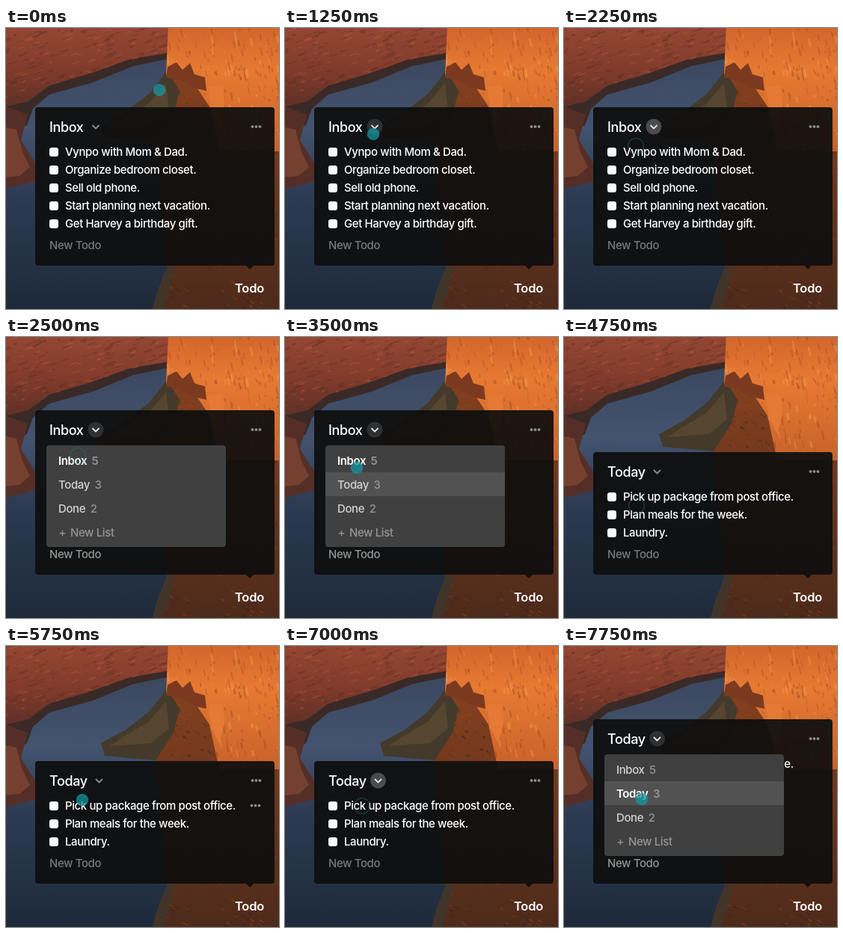
Recreate the animation shown at these times as an HTML page. Size 365x376 px, loop 8000 ms.

```html
<!DOCTYPE html>
<html lang="en">
<head>
<meta charset="utf-8">
<title>Todo</title>
<style>
  html, body { margin: 0; width: 100%; height: 100%; overflow: hidden; background: #26374f; }
  svg { display: block; width: 365px; height: 376px; }
  text { font: 500 15px Inter, Roboto, sans-serif; letter-spacing: -.4px; fill: #fff; }
  .title { font-size: 18px; }
  .muted { fill: #949494; }
  .dim { fill: #787878; }
  .soft { fill: #d2d2d2; }
  .bold { font-weight: 600; fill: #fff; }
  .brand { font-size: 16.5px; font-weight: 600; letter-spacing: -.25px; }
</style>
</head>
<body>
<svg viewBox="0 0 365 376">
  <defs>
    <linearGradient id="water" x2="0" y2="1">
      <stop offset=".1" stop-color="#3b475e"/>
      <stop offset=".36" stop-color="#43536f"/>
      <stop offset=".6" stop-color="#2c3b52"/>
      <stop offset="1" stop-color="#1e2a3a"/>
    </linearGradient>
    <linearGradient id="shade" x2="0" y2="1">
      <stop stop-color="#954833"/>
      <stop offset=".5" stop-color="#833c2b"/>
      <stop offset="1" stop-color="#5f3028"/>
    </linearGradient>
    <linearGradient id="sun" x2="0" y2="1">
      <stop stop-color="#d1652b"/>
      <stop offset=".35" stop-color="#e67a33"/>
      <stop offset="1" stop-color="#c9622a"/>
    </linearGradient>
    <linearGradient id="ground" x2="0" y2="1">
      <stop stop-color="#84401f"/>
      <stop offset="1" stop-color="#4d2a1b"/>
    </linearGradient>
    <filter id="blur"><feGaussianBlur stdDeviation=".7"/></filter>
    <clipPath id="shadeClip"><path d="M0 0H218V34L165 43 112 62 58 78 30 98 0 106Z"/></clipPath>
    <clipPath id="sunClip"><path d="M217 0H365V165H285L272 105 250 72 214 62Z"/></clipPath>
    <clipPath id="groundClip"><path d="M216 62H285V150H365V376H195L215 320 200 150Z"/></clipPath>
  </defs>
  <rect width="365" height="376" fill="url(#water)"/>
  <g filter="url(#blur)">
    <path fill="#3a2a27" d="M-3 90 58 76 112 58 165 40 218 30V41L170 51 116 73 58 89 36 108 28 130 -3 145Z"/>
    <path fill="url(#shade)" d="M-3 -3H218V33L165 42 112 61 58 77 30 98 -3 106Z"/>
    <g id="shadeRock" clip-path="url(#shadeClip)"></g>
    <path fill="#552f27" d="M-3 104 29 116 20 150 40 182 40 205 -3 216Z"/>
    <path fill="#75402f" d="M-3 132 14 136 22 166 32 186 18 198 -3 200Z"/>
    <path fill="url(#ground)" d="M216 60H290V150H368V379H195L215 320 200 150Z"/>
    <g id="groundRock" clip-path="url(#groundClip)"></g>
    <path fill="#443a2b" d="M215 56 208 67 191 88 160 112 127 130 132 147 200 153 224 116 232 84Z"/>
    <path fill="#57462f" d="M214 74 190 102 156 122 138 134 194 130 218 110Z"/>
    <path fill="url(#sun)" d="M217 -3H368V165H285L272 105 250 72 214 62Z"/>
    <g id="sunRock" clip-path="url(#sunClip)"></g>
    <path fill="#7b3a20" d="M216 52 228 46 236 56 246 47 252 62 266 66 268 84 250 80 232 70 214 66Z"/>
    <path fill="#e47a36" d="M270 78 290 77 292 104 285 130 274 108Z"/>
    <path fill="#41352a" d="M195 379 203 350 215 320 226 318 218 350 209 379Z"/>
  </g>
  <g id="app"></g>
  <text class="brand" x="306" y="354">Todo</text>
  <circle id="cursor"/>
</svg>
<script>
const LOOP = 8000, STEP = 250;
const $ = id => document.getElementById(id);

function seeded(seed) {
  return () => (seed = (seed * 16807) % 2147483647) / 2147483647;
}

// Rock texture: short strokes that lean along the strata or the cracks.
function rock(id, count, [x, y, w, h], [dx, dy], colors) {
  const rnd = seeded(count * 97 + x);
  let out = '';
  for (let i = 0; i < count; i++) {
    const len = .3 + rnd();
    const px = x + rnd() * w, py = y + rnd() * h;
    const color = colors[Math.floor(rnd() * colors.length)];
    out += `<path d="M${px} ${py}l${dx * len} ${dy * len}" stroke="${color}" stroke-width="${1 + rnd() * 2}" opacity=".38"/>`;
  }
  $(id).innerHTML = out;
}
rock('shadeRock', 230, [-10, 0, 230, 100], [9, -3], ['#572a22', '#b05a40', '#6b3227']);
rock('sunRock', 190, [215, 0, 150, 165], [2, 9], ['#93421f', '#f7a052', '#b04f25']);
rock('groundRock', 330, [190, 60, 175, 316], [5, 3], ['#33241a', '#9a4a24', '#5c2e1c']);

const LISTS = {
  Inbox: ['Vynpo with Mom &amp; Dad.', 'Organize bedroom closet.', 'Sell old phone.',
          'Start planning next vacation.', 'Get Harvey a birthday gift.'],
  Today: ['Pick up package from post office.', 'Plan meals for the week.', 'Laundry.']
};
const MENU = [['Inbox', 5], ['Today', 3], ['Done', 2]];

// Cursor stops: time, x, y
const PATH = [
  [0, 205, 83], [1000, 127, 156], [1250, 118, 142], [1750, 101, 141], [2000, 101, 141],
  [2250, 96, 158], [2500, 96, 159], [3250, 96, 168], [4250, 97, 213], [4500, 97, 228],
  [4750, 97, 226], [5000, 91, 205], [5500, 91, 205], [5750, 102, 206], [6000, 116, 118],
  [6250, 104, 189], [6500, 104, 189], [7000, 103, 214], [7250, 103, 214], [7750, 104, 205],
  [8000, 104, 205]
];
const CLICKS = [2250, 4500, 7000];

const within = (t, from, to) => t >= from && t < to;
const text = (x, y, body, cls = '') => `<text class="${cls}" x="${x}" y="${y}">${body}</text>`;
const dots = (x, y) => [-5, 0, 5]
  .map(d => `<rect x="${x + d - 1.8}" y="${y - 1.8}" width="3.6" height="3.6" rx="1.4" fill="#8c8c8c"/>`).join('');

function cursorAt(t) {
  const i = PATH.findIndex(p => p[0] > t) - 1;
  const [t0, x0, y0] = PATH[i], [t1, x1, y1] = PATH[i + 1];
  const u = (t - t0) / (t1 - t0), e = u * u * (3 - 2 * u);
  return [x0 + (x1 - x0) * e, y0 + (y1 - y0) * e];
}

function header(list, top, hover) {
  const x = list === 'Inbox' ? 120 : 124.5, y = top + 26;
  const disc = hover ? `<circle cx="${x}" cy="${y}" r="10.5" fill="${hover}"/>` : '';
  return text(58, y + 6.5, list, 'title') + disc +
    `<path d="M${x - 4.5} ${y - 2}l4.5 4.5 4.5-4.5" fill="none" stroke="${hover ? '#e4e4e4' : '#8c8c8c'}" stroke-width="1.8"/>` +
    dots(334.5, y);
}

function todo(label, y) {
  return `<rect x="58" y="${y - 6}" width="12" height="12" rx="3.3" fill="#fafafa"/>` + text(79, y + 5, label);
}

function menu(current, lit) {
  const rows = MENU.map(([name, count], i) => {
    const y = 166 + i * 32;
    const bar = name === lit ? `<rect x="54" y="${y - 17}" width="240" height="32" fill="#525252"/>` : '';
    return bar + text(70, y + 5, `${name}<tspan class="muted" dx="6.5">${count}</tspan>`,
      name === current ? 'bold' : 'soft');
  }).join('');
  return `<rect x="54" y="145" width="240" height="136" rx="4" fill="#404040"/>` + rows +
    text(70.5, 267, '+', 'muted') + text(86, 267, 'New List', 'muted');
}

function render(t) {
  const list = within(t, 0, 4750) ? 'Inbox' : 'Today';
  const open = within(t, 2500, 4750) || t >= 7250;
  const items = LISTS[list];
  const top = open ? 98 : 226 - items.length * 24;
  const pressed = t === 2250 || within(t, 6750, 7250);
  const hovered = within(t, 1250, 4750) || t >= 6250;
  const hover = pressed ? '#4b4b4b' : hovered ? '#303030' : '';
  const lit = within(t, 3000, 3500) ? 'Inbox' : within(t, 3500, 4750) || t >= 7500 ? 'Today' : '';

  $('app').innerHTML =
    `<path d="M43 ${top}H355a4 4 0 0 1 4 4V314a4 4 0 0 1-4 4H331l-5 5-5-5H43a4 4 0 0 1-4-4V${top + 4}a4 4 0 0 1 4-4Z" fill="#0f0f0f" fill-opacity=".93"/>` +
    header(list, top, hover) +
    items.map((label, i) => todo(label, top + 60 + i * 24)).join('') +
    (within(t, 5000, 6000) ? dots(333.5, 213.5) : '') +
    text(58, 296, 'New Todo', open ? 'muted' : 'dim') +
    (open ? menu(list, lit) : '');

  // A click turns the dot into a ring that lasts two steps.
  const [x, y] = cursorAt(t), cursor = $('cursor');
  const clicked = CLICKS.some(c => within(t, c, c + 2 * STEP));
  const look = clicked
    ? { r: 10.5, fill: 'none', stroke: '#278078', 'stroke-width': 1.1, opacity: .45 }
    : { r: 8.3, fill: '#1497a3', stroke: 'none', 'stroke-width': 0, opacity: .73 };
  for (const [key, value] of Object.entries({ cx: x, cy: y, ...look })) cursor.setAttribute(key, value);
}

const start = performance.now();
let shown = -1;
function tick() {
  const t = Math.floor(((performance.now() - start) % LOOP) / STEP) * STEP;
  if (t !== shown) render(shown = t);
  requestAnimationFrame(tick);
}
tick();
</script>
</body>
</html>
```
